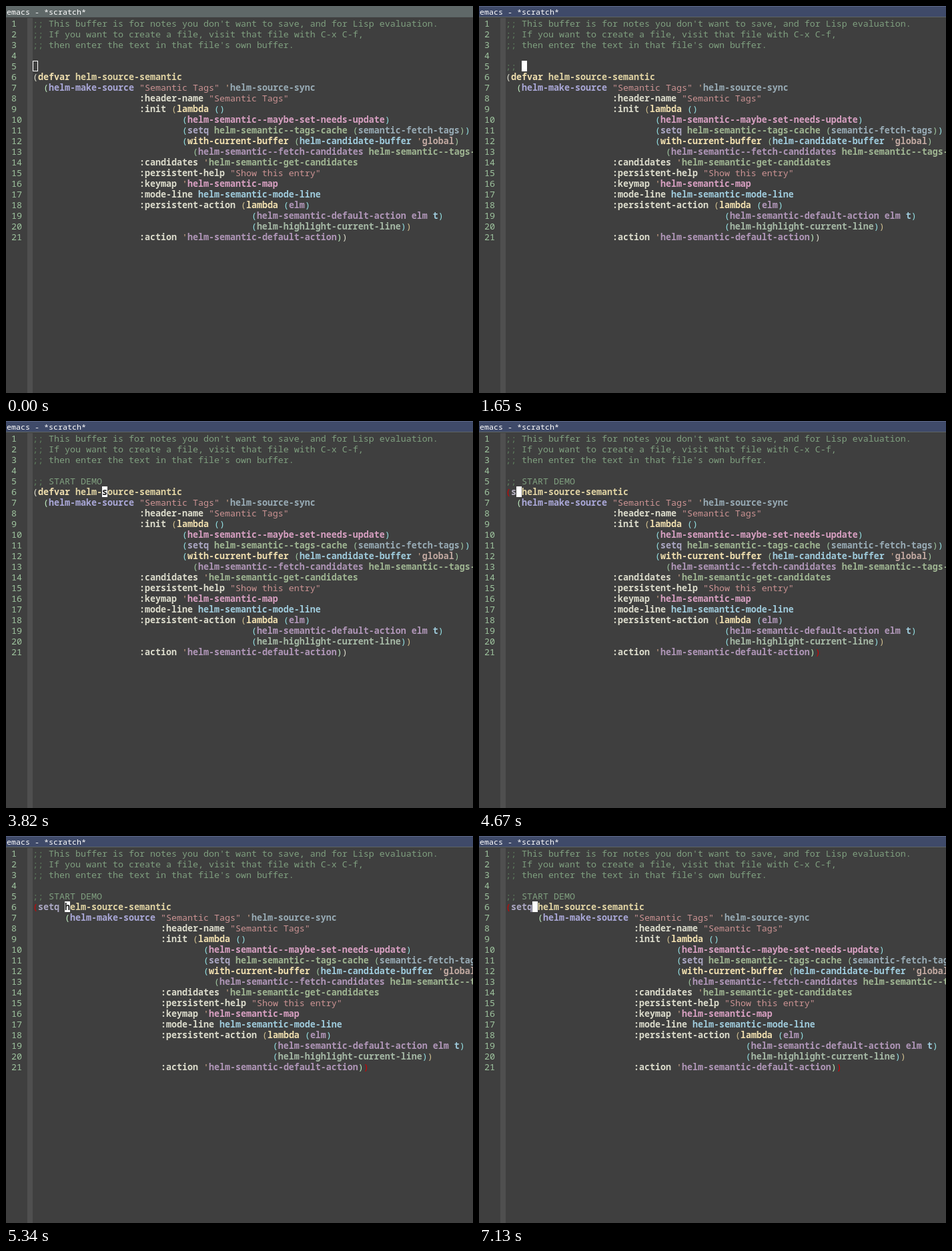
An HTML page for the animation above (8 s loop, 700 px wide and 580 px high).

```html
<!DOCTYPE html>
<html lang="en">
<head>
<meta charset="utf-8">
<title>Editor session</title>
<style>
  html, body { margin: 0; width: 100%; height: 100%; overflow: hidden; background: #3f3f3f; }
  #stage { position: absolute; left: 0; top: 0; width: 700px; height: 580px; overflow: hidden;
    background: #3f3f3f; color: #dcdccc; white-space: pre;
    font: 13.3333px/16px "Noto Sans Mono", "Liberation Mono", monospace;
    font-variant-ligatures: none; }
  #title { position: absolute; left: 0; top: 0; width: 699px; height: 17px; padding-left: 1px;
    color: #fff; font-size: 11.6667px; line-height: 17px;
    background: #5f6868; box-shadow: inset 0 -1px #5c6464; }
  #title.on { background: #3f4a69; box-shadow: inset 0 1px #5f6a8a, inset 0 -1px #5c6464; }
  #fringe { position: absolute; left: 32px; top: 18px; width: 8px; height: 562px; background: #4f4f4f; }
  #nums { position: absolute; left: 8px; top: 18px; color: #9fc59f; }
  #text { position: absolute; left: 40px; top: 18px; }
  #text div { height: 16px; }
  #cursor { position: absolute; width: 8px; height: 16px; box-sizing: border-box;
    background: #fff; color: #222; }
  #cursor.hollow { background: none; border: 1px solid #fff; }
  b { font-weight: 700; }
</style>
</head>
<body>
<div id="stage">
  <div id="title">emacs - *scratch*</div>
  <div id="fringe"></div>
  <div id="nums"></div>
  <div id="text"></div>
  <div id="cursor"></div>
</div>
<script>
const LOOP = 8000;
const $ = id => document.getElementById(id);

const INTRO = [
  ";; This buffer is for notes you don't want to save, and for Lisp evaluation.",
  ";; If you want to create a file, visit that file with C-x C-f,",
  ";; then enter the text in that file's own buffer.",
  ""
];
// [columns past the form's own indent, code]
const BODY = [
  [0, `(helm-make-source "Semantic Tags" 'helm-source-sync`],
  [18, `:header-name "Semantic Tags"`],
  [18, `:init (lambda ()`],
  [26, `(helm-semantic--maybe-set-needs-update)`],
  [26, `(setq helm-semantic--tags-cache (semantic-fetch-tags))`],
  [26, `(with-current-buffer (helm-candidate-buffer 'global)`],
  [28, `(helm-semantic--fetch-candidates helm-semantic--tags-cache 0)))`],
  [18, `:candidates 'helm-semantic-get-candidates`],
  [18, `:persistent-help "Show this entry"`],
  [18, `:keymap 'helm-semantic-map`],
  [18, `:mode-line helm-semantic-mode-line`],
  [18, `:persistent-action (lambda (elm)`],
  [39, `(helm-semantic-default-action elm t)`],
  [39, `(helm-highlight-current-line))`],
  [18, `:action 'helm-semantic-default-action))`]
];

const DEPTH = ["#dcdccc", "#bfebbf", "#d0bf8f", "#93e0e3", "#9fc59f"];
const [KEY, PINK, MAUVE, GREEN, SKY, STEEL, PALE] =
  ["#f0dfaf", "#d8a0c2", "#b096b8", "#9fb592", "#9fcbdc", "#98abb5", "#b5b0c0"];
const NAMES = {
  "defvar": KEY, "lambda": KEY, "with-current-buffer": KEY,
  "helm-source-semantic": "#e0d3a3",
  "helm-make-source": "#aaa8d8",
  "helm-source-sync": STEEL, "semantic-fetch-tags": STEEL,
  "helm-semantic--maybe-set-needs-update": PINK, "helm-semantic-map": PINK,
  "helm-semantic--tags-cache": GREEN, "helm-semantic-get-candidates": GREEN,
  "helm-candidate-buffer": SKY, "helm-semantic-mode-line": SKY, "t": SKY,
  "helm-semantic--fetch-candidates": MAUVE, "helm-semantic-default-action": MAUVE,
  "elm": MAUVE,
  "global": "#c0a8a0",
  "helm-highlight-current-line": "#a5b8a5",
  "s": PALE, "se": PALE, "set": PALE, "setq": "#aca8c4"
};

// Each step changes only the listed fields; pos is [row, column].
const DEMO = ";; START DEMO";
const type = (t, n) => [t, { note: DEMO.slice(0, n), pos: [4, n] }];
const form = name => `(${name} helm-source-semantic`;
const STEPS = [
  [0, { on: false, hollow: true, note: "", head: form("defvar"), indent: 2, pos: [4, 0], red: false }],
  [460, { on: true }],
  [500, { hollow: false }],
  type(1650, 3),
  type(2190, 4), type(2290, 5), type(2390, 6), type(2480, 7),
  type(2640, 8), type(2740, 9), type(2880, 10),
  type(3030, 11), type(3090, 12), type(3170, 13),
  [3700, { pos: [5, 13] }],
  [3830, { pos: [5, 8] }],
  [3960, { pos: [5, 1] }],
  [4080, { red: true }],
  [4430, { head: form("") }],
  [4670, { head: form("s"), pos: [5, 2] }],
  [4710, { indent: 3 }],
  [4750, { head: form("se"), pos: [5, 3] }],
  [4790, { indent: 4 }],
  [4830, { head: form("set"), pos: [5, 4] }],
  [4870, { indent: 5 }],
  [4920, { head: form("setq"), pos: [5, 5] }],
  [4960, { indent: 6 }],
  [5300, { pos: [5, 6] }],
  [5950, { head: "(setq\n helm-source-semantic", indent: 1, pos: [6, 1] }],
  [6430, { pos: [5, 1] }],
  [6540, { pos: [5, 5] }],
  [7090, { head: form("setq") }],
  [7130, { indent: 6 }]
];

let state = {};
const states = STEPS.map(([at, change]) => ({ ...(state = { ...state, ...change }), at }));

function add(row, text, color, bold) {
  const el = document.createElement(bold ? "b" : "span");
  el.textContent = text;
  el.style.color = color;
  row.append(el);
  return el;
}

function paint(s) {
  const lines = [...INTRO, s.note, ...s.head.split("\n"),
    ...BODY.map(([col, code]) => " ".repeat(s.indent + col) + code)];
  const parens = [];
  let depth = 0;

  const rows = lines.map(line => {
    const row = document.createElement("div");
    if (line.startsWith(";")) {
      add(row, line.slice(0, 3), "#5f7f5f");
      add(row, line.slice(3), "#7f9f7f");
      return row;
    }
    for (const tok of line.match(/"[^"]*"|[()']|\s+|[^\s()'"]+/g) || []) {
      if (tok === "(") parens.push(add(row, tok, DEPTH[depth++]));
      else if (tok === ")") parens.push(add(row, tok, DEPTH[--depth]));
      else if (tok === "'") add(row, tok, "#dfaf8f");
      else if (tok[0] === '"') add(row, tok, "#cc9393");
      else add(row, tok, NAMES[tok] || "#dcdccc", tok.trim() && tok !== "0");
    }
    return row;
  });
  if (s.red) for (const p of [parens[0], parens.at(-1)]) p.style.color = "#d00000";

  $("text").replaceChildren(...rows);
  $("nums").textContent = lines.map((_, i) => i + 1).join("\n");
  $("title").className = s.on ? "on" : "";

  const [r, c] = s.pos, cursor = $("cursor");
  cursor.className = s.hollow ? "hollow" : "";
  cursor.style.left = 40 + c * 8 + "px";
  cursor.style.top = 18 + r * 16 + "px";
  cursor.style.fontWeight = r > 4 ? 700 : 400;
  cursor.textContent = lines[r][c] || "";
}

let shown;
function tick() {
  const t = performance.now() % LOOP;
  const now = states.findLast(s => s.at <= t);
  if (now !== shown) paint(shown = now);
  requestAnimationFrame(tick);
}
tick();
</script>
</body>
</html>
```
